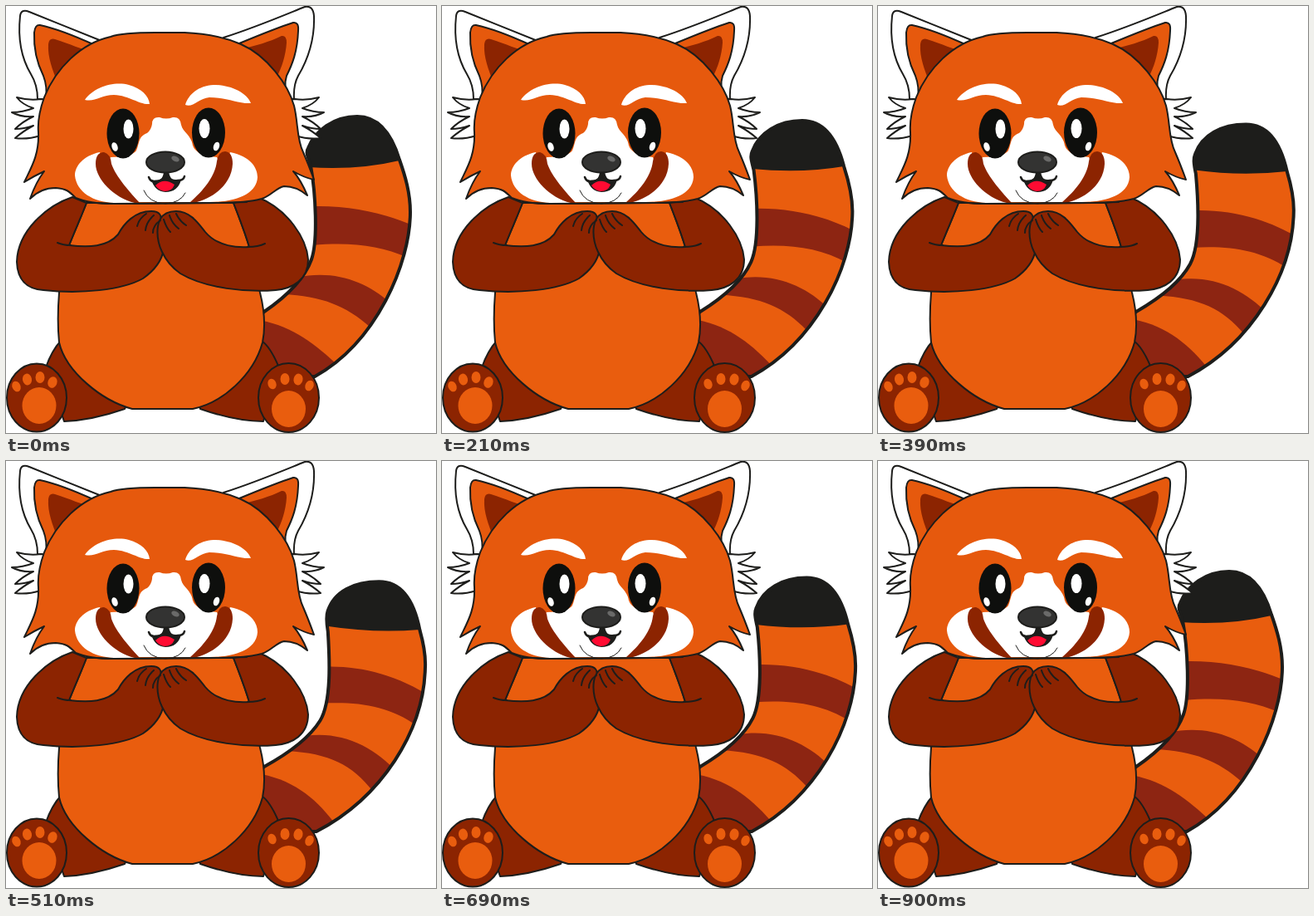
These frames come from a looping animation (518 px wide and 514 px high, 0.93 s). An HTML page:

```html
<!DOCTYPE html>
<html lang="en">
<head>
<meta charset="utf-8">
<title>Red panda</title>
<style>
html, body { margin: 0; width: 100%; height: 100%; overflow: hidden; background: #fff; }
svg { display: block; width: 518px; height: 514px; }
.ink { stroke: #1d1d1b; stroke-width: 2; stroke-linejoin: round; stroke-linecap: round; }
.line { fill: none; }
.white { fill: #fff; }
.head { fill: #e6590d; }
.orange { fill: #e95d0e; }
.brown { fill: #8c2401; }
.band { fill: #8d2512; }
.black { fill: #1d1d1b; }
.eye { fill: #0e0f0d; }

/* Tail swings out in 18 steps and back in 12, then rests one step. */
.sway { animation: sway 930ms infinite; }
@keyframes sway {
  0% { d: var(--in); animation-timing-function: steps(18, end); }
  58.0645% { d: var(--out); animation-timing-function: steps(12, end); }
  96.7742%, 100% { d: var(--in); }
}
.outline {
  --in: path("M311 368C330 355 358 333 368 305C376 282 373 225 367 192C363 180 361 176 364 171C372 150 395 133 423 133C448 133 464 152 474 185C481 205 487 225 487 248C487 310 446 405 372 446L300 446L300 380Z");
  --out: path("M311 368C335 355 365 335 379 313C393 290 391 241 389 206C387 193 387 187 389 181C397 157 421 146 451 146C481 146 494 173 500 205C505 223 507 236 506 250C504 326 453 405 374 446L300 446L300 380Z");
}
.tip {
  --in: path("M340 120H510V178L474 186Q424 198 364 194L340 190Z");
  --out: path("M360 130H530V202L500 204Q444 208 388 199L360 194Z");
}
.upper {
  --in: path("M369 241C415 240 455 249 490 264L484 303C450 288 415 284 369 288Z");
  --out: path("M387 248C430 247 472 259 508 282L496 320C462 295 425 290 382 292Z");
}
.middle {
  --in: path("M350 327C395 317 435 332 462 357L438 386C410 361 380 349 334 347Z");
  --out: path("M362 331C405 325 445 345 472 376L442 398C418 366 390 352 339 349Z");
}
.base {
  --in: path("M290 376C335 380 365 400 397 430L375 460L290 460Z");
  --out: path("M290 374C340 379 370 402 394 434L375 460L290 460Z");
}
</style>
</head>
<body>
<svg viewBox="0 0 518 514">
  <defs>
    <clipPath id="tail"><path class="sway outline"/></clipPath>
    <path id="fur" class="ink white" d="M60 113L42 112Q28 114 13 110Q20 119 33 123Q20 128 7 128Q18 134 33 133Q20 139 11 148Q22 148 33 144Q20 151 11 159Q25 161 42 156H60"/>
  </defs>

  <g id="tail-art">
    <g clip-path="url(#tail)">
      <rect class="orange" x="290" y="110" width="228" height="350"/>
      <path class="sway tip black"/>
      <path class="sway upper band"/>
      <path class="sway middle band"/>
      <path class="sway base band"/>
    </g>
    <path class="sway outline ink line" style="stroke-width:4"/>
  </g>

  <g id="legs" class="ink brown">
    <path d="M66 403Q55 415 48 435L70 500C95 499 120 493 143 485L150 470Z"/>
    <path d="M308 403Q318 410 328 433L310 500C282 500 257 493 234 485L230 470Z"/>
  </g>

  <path class="ink orange" d="M97 237C90 255 84 268 76 288Q68 315 64 345C62 370 62 385 64 405C72 440 115 475 152 485H225C260 478 298 445 309 405C313 385 311 365 306 345Q301 315 293 290C287 270 281 255 274 237Z"/>

  <g id="feet">
    <ellipse class="ink brown" cx="37" cy="471.5" rx="36" ry="41"/>
    <ellipse class="ink brown" cx="340.5" cy="471.5" rx="36.5" ry="41.5"/>
    <g class="orange">
      <ellipse cx="40" cy="481" rx="20.5" ry="22"/>
      <ellipse cx="12.5" cy="458" rx="5" ry="6.5" transform="rotate(-25 12.5 458)"/>
      <ellipse cx="25.5" cy="449.5" rx="5.5" ry="7" transform="rotate(-12 25.5 449.5)"/>
      <ellipse cx="41" cy="447" rx="5.5" ry="7"/>
      <ellipse cx="56" cy="453" rx="5.5" ry="7" transform="rotate(20 56 453)"/>
      <ellipse cx="340.5" cy="485" rx="20.5" ry="22"/>
      <ellipse cx="320.5" cy="455" rx="5" ry="6.5" transform="rotate(-20 320.5 455)"/>
      <ellipse cx="336" cy="449" rx="5.5" ry="7"/>
      <ellipse cx="352" cy="449.5" rx="5.5" ry="7" transform="rotate(12 352 449.5)"/>
      <ellipse cx="365.5" cy="457" rx="5" ry="6.5" transform="rotate(25 365.5 457)"/>
    </g>
  </g>

  <g id="arms" class="ink">
    <path class="brown" d="M80 230C50 240 14 270 13 308C14 335 30 341 45 342C90 347 140 342 165 328C182 316 188 305 190 293L186 262Q190 247 175 247C155 247 142 262 135 275C122 290 100 291 76 288C84 268 90 255 97 237Z"/>
    <path class="brown" d="M303 230C340 245 362 280 364 305C364 330 345 340 325 342C290 345 240 340 210 322C190 308 180 285 183 265Q186 247 205 247C222 247 232 262 240 272C255 290 280 291 293 290C287 270 281 255 274 237Z"/>
    <path class="line" d="M62 285Q69 288 78 288M291 290Q304 290 312 286M169 250Q160 256 158 265M178 252Q169 260 168 270M186 258Q177 264 177 273M190 257Q193 267 198 272M197 252Q200 262 208 268M205 250Q209 259 217 264"/>
  </g>

  <g id="ears" class="ink">
    <path class="white" d="M125 46C95 34 60 20 28 7Q18 3 17 12C14 40 18 62 30 82Q38 95 38 112L60 115Z"/>
    <path class="head" d="M107 47C85 37 60 27 41 23Q35 22 34 32C33 55 38 70 45 84Q50 97 48 112Z"/>
    <path class="white" d="M262 38C300 26 335 11 360 1Q370 -1 371 12C372 40 365 62 352 84Q346 95 347 112L325 110Z"/>
    <path class="head" d="M281 45C310 33 330 25 346 20Q353 19 352 30C351 55 345 70 338 84Q334 97 340 112Z"/>
  </g>
  <path class="brown" d="M104 55C90 52 78 46 59 40Q52 38 51 46C50 62 56 76 61 90Z"/>
  <path class="brown" d="M283 52C300 48 318 43 332 36Q338 35 338 44C337 60 332 74 327 84Z"/>

  <use href="#fur"/>
  <use href="#fur" transform="matrix(-1 0 0 1 390 0)"/>

  <path class="ink head" d="M126 37C140 32 165 32 180 32H215C240 33 262 37 283 46C315 60 340 95 347 120C352 140 350 160 358 176Q364 190 371 209Q360 207 346 199Q355 209 363 228Q350 217 335 217C325 219 320 228 308 232Q290 237 255 237L130 238Q100 238 84 231C75 222 72 220 60 219Q42 219 29 232Q36 212 46 199Q33 205 22 212C30 195 40 180 39 152C38 140 41 124 46 110C60 75 90 45 126 37Z"/>

  <g id="face">
    <g class="white">
      <path d="M95 113C105 98 130 90 148 95C163 99 172 108 173 118C160 119 150 108 130 107C115 107 107 116 95 113Z"/>
      <path d="M216 119C220 106 232 96 250 95C270 95 290 104 295 117C280 118 268 110 245 110C232 111 225 123 216 119Z"/>
      <path d="M176 142Q176 133 185 134Q193 137 201 134Q210 133 211 143C213 152 223 155 225 168Q229 180 254 182L262 200L222 236H160L120 195L126 182Q152 181 157 174C161 165 159 157 170 153Q175 149 176 142Z"/>
      <path d="M113 176C93 180 83 193 83 204C85 224 105 236 130 237H160L118 195Z"/>
      <path d="M270 176C295 181 303 195 303 206C302 225 280 236 245 236H222L264 195Z"/>
    </g>
    <path class="brown" d="M108 190Q108 176 118 176Q126 178 127 190C132 205 150 225 161 237H155C130 231 108 208 108 190Z"/>
    <path class="brown" d="M254 187Q256 175 264 175Q273 176 273 190C272 214 250 232 226 237H221C238 222 252 205 254 187Z"/>
    <g class="eye">
      <ellipse cx="141" cy="153.5" rx="19.5" ry="30"/>
      <ellipse cx="244" cy="152.5" rx="20" ry="30"/>
    </g>
    <g class="white">
      <ellipse cx="147.5" cy="148" rx="6" ry="11.5"/>
      <ellipse cx="131" cy="169.5" rx="3.5" ry="5.5" transform="rotate(-18 131 169.5)"/>
      <ellipse cx="239" cy="147.5" rx="6.5" ry="11.5"/>
      <ellipse cx="253.5" cy="169" rx="3.5" ry="5.5" transform="rotate(18 253.5 169)"/>
    </g>
    <path class="black" d="M175 209Q190 213 190 198H196Q197 213 211 209Q207 224 192 224Q179 223 175 209Z"/>
    <path fill="#ff0b32" d="M180 216Q190 206 203 215Q200 223 191 223Q184 222 180 216Z"/>
    <path class="ink line" style="stroke-width:2.5" d="M172 206Q174 212 180 211Q191 211 192 201Q196 212 207 210Q214 210 215 205"/>
    <path class="ink line" style="stroke-width:1" d="M166 222Q172 237 192 238Q210 237 216 225"/>
    <ellipse class="ink" fill="#333332" cx="192" cy="188" rx="23" ry="12.5"/>
    <ellipse fill="#6a6a69" cx="204" cy="184" rx="5" ry="3" transform="rotate(25 204 184)"/>
  </g>
  <path class="ink line" d="M107 237L130 238L255 237L290 236"/>
</svg>
</body>
</html>
```
